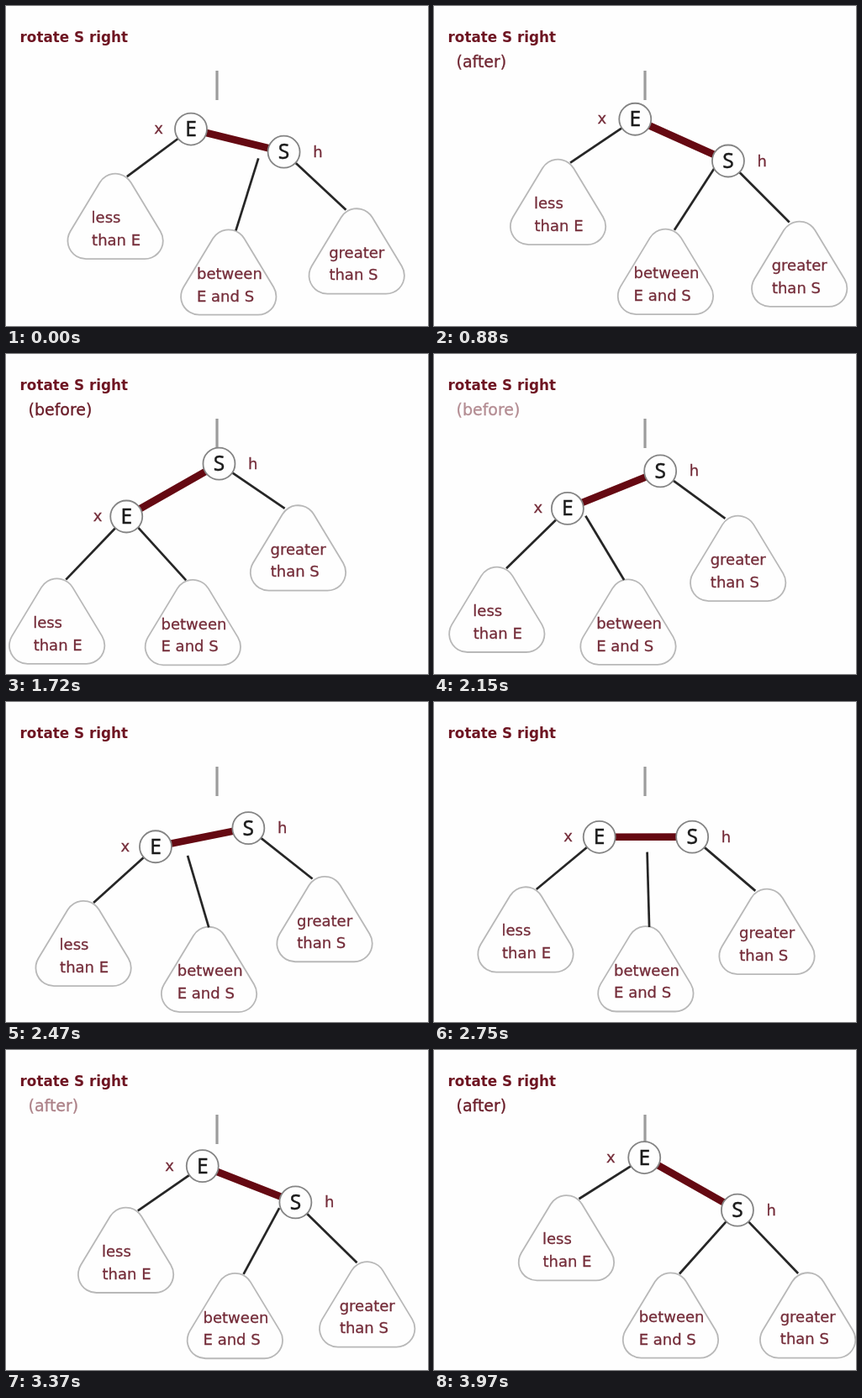
An HTML page for the animation above (3990 ms loop, 502x381 px).

```html
<!DOCTYPE html>
<html lang="en">
<head>
<meta charset="utf-8">
<title>Tree rotation</title>
<style>
  html, body { margin: 0; width: 100%; height: 100%; overflow: hidden; background: #fefefe; }
  svg { display: block; width: 100vw; height: 100vh; }
  text {
    font-family: "DejaVu Sans", Verdana, sans-serif; font-size: 18px;
    fill: #742c39; stroke: #742c39; stroke-width: .3;
  }
  .title { font-size: 16.8px; font-weight: bold; fill: #6e1522; stroke: none; }
  .state { font-size: 19px; fill: #6a1c28; stroke: #6a1c28; }
  .key {
    font-family: "Noto Sans", "Open Sans", sans-serif; font-size: 24.5px;
    fill: #1c1c1c; stroke: #1c1c1c; stroke-width: .4; text-anchor: middle;
  }
  .name { text-anchor: middle; }
  .edge { stroke: #262626; stroke-width: 2.7; }
  .red { stroke: #650912; stroke-width: 8.6; }
  .stem { stroke: #9c9c9c; stroke-width: 3.2; }
  .node { fill: #fefefe; stroke: #848484; stroke-width: 1.8; }
  .rim, .body { stroke-linejoin: round; }
  .rim { fill: #b8b8b8; stroke: #b8b8b8; stroke-width: 45.2; }
  .body { fill: #fefefe; stroke: #fefefe; stroke-width: 41.6; }
</style>
</head>
<body>
<svg viewBox="0 0 502 381" preserveAspectRatio="none">
  <defs>
    <!-- subtree outline; origin at the middle of its base -->
    <g id="hull">
      <path class="rim" d="M-35-22H35L0-80Z"/>
      <path class="body" d="M-35-22H35L0-80Z"/>
    </g>
  </defs>

  <text class="title" x="16.6" y="43.3">rotate S right</text>
  <text class="state" id="before" x="26.5" y="73">(before)</text>
  <text class="state" id="after" x="26.5" y="73">(after)</text>

  <g id="less"><use href="#hull"/><text x="-28.5" y="-43.5">less</text><text x="-28" y="-16.5">than E</text></g>
  <g id="between"><use href="#hull"/><text x="-37.8" y="-43">between</text><text x="-37.8" y="-16.5">E and S</text></g>
  <g id="greater"><use href="#hull"/><text x="-33" y="-43">greater</text><text x="-32.8" y="-16.7">than S</text></g>

  <line class="stem" x1="251" y1="77" x2="251" y2="112"/>
  <line class="edge" id="edgeLess"/>
  <line class="edge" id="edgeBetween"/>
  <line class="edge" id="edgeGreater"/>
  <line class="red" id="link"/>

  <g id="nodeE"><circle class="node" r="19"/><text class="key" y="8.5">E</text><text class="name" id="nameX" y="5.5">x</text></g>
  <g id="nodeS"><circle class="node" r="19"/><text class="key" y="8.5">S</text><text class="name" x="40.3" y="6">h</text></g>
</svg>
<script>
  const LOOP = 3990, HOLD = 547, TICK = 46.85;
  const PHASE_STEP = 0.01834;
  const CUT = 19;            // tick at which the rotation starts over

  const $ = id => document.getElementById(id);
  const clamp = v => Math.max(0, Math.min(1, v));
  const mix = (a, b, u) => a.map((v, i) => v + (b[i] - v) * u);
  const place = (id, [x, y]) => $(id).setAttribute("transform", `translate(${x} ${y})`);

  function join(id, [x1, y1], [x2, y2]) {
    const attrs = { x1, y1, x2, y2 };
    for (const k in attrs) $(id).setAttribute(k, attrs[k]);
  }

  function phaseAt(t) {
    const n = t < HOLD ? -1 : Math.floor((t - HOLD) / TICK);
    const p = n < CUT ? 0.795 + (n - 7) * PHASE_STEP : (n - 19.3) * PHASE_STEP;
    return clamp(p);
  }

  function draw(t) {
    const p = phaseAt(t);
    const u = (1 - Math.cos(Math.PI * p)) / 2;

    const e = mix([140.3, 195.3], [250.3, 128], u);
    const s = mix([250.5, 129], [361, 190.7], u);
    const less = mix([58, 371.7], [157.5, 274.7], u);
    const between = mix([220.7, 370.7], [281.5, 367], u);
    const greater = mix([344.8, 279.6], [444.7, 367], u);

    place("nodeE", e);
    place("nodeS", s);
    place("less", less);
    place("between", between);
    place("greater", greater);
    $("nameX").setAttribute("x", -34 - 6 * u);

    join("link", e, s);
    join("edgeLess", e, [less[0] + 10.5 + 4.5 * u, less[1] - 100.5 + 3 * u]);
    join("edgeGreater", s, [greater[0] - 16 + 4.5 * u, greater[1] - 98 - 3 * u]);

    // the middle subtree's edge slides from one node to the other
    const leave = u * (1 - u) ** 4;
    const arrive = u ** 4 * (1 - u);
    join("edgeBetween",
      [152 + 196 * u - 60 * leave + 85 * arrive, 208 - 108 * u + 104 * u * u - 40 * arrive],
      [212 + 80 * u + 24 * u * u * (1 - u), 269.5 - 3 * u]);

    $("before").style.opacity = clamp((0.33 - p) / 0.12);
    $("after").style.opacity = clamp((p - 0.68) / 0.12);
  }

  const start = performance.now();
  function frame() {
    draw((performance.now() - start) % LOOP);
    requestAnimationFrame(frame);
  }
  frame();
</script>
</body>
</html>
```
